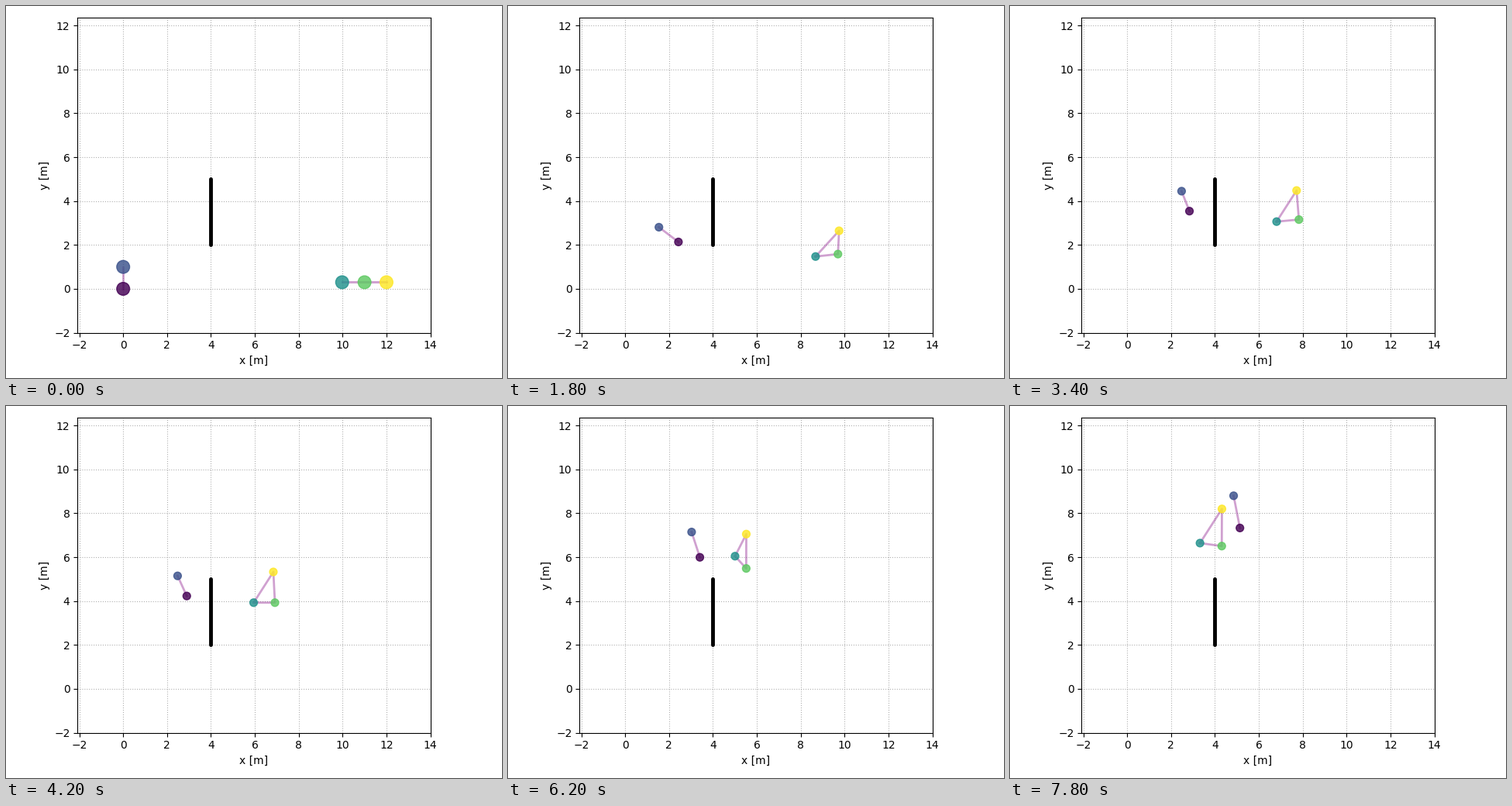
A matplotlib script for the animation above (8 s loop, 640 by 480 pixels).

```python
import numpy as np
import matplotlib.pyplot as plt
from matplotlib.animation import FuncAnimation

W, H, DPI = 640, 480, 100
FRAMES, STEP_MS = 40, 200
UNIT = 28.31                 # pixels per metre
LEFT, RIGHT, TOP, BOTTOM = 92.2, 547.55, 15.4, 421.58
ORIGIN_X, ORIGIN_Y = 151.2, 364.95


def settle(k, tau):
    """Rise from 0 towards 1."""
    return 1 - np.exp(-k / tau)


def bump(k, center, width):
    return np.exp(-((k - center) / width)**2)


def swing(k, start):
    """Accelerate to the right once past the wall."""
    return 0.01 * max(k - start, 0)**2


def wave(k, half):
    return np.sin(np.pi * k / half)


def pair_positions(k):
    """Two agents that climb along the left side of the wall."""
    lower = (2.95 * settle(k, 5.2) + swing(k, 24.2),
             0.172 * k + 0.62 * settle(k, 3) + 0.18 * bump(k, 34, 2.5))
    upper = (2.48 * min(k / 13, 1)**1.3 + swing(k, 23.6),
             1 + 0.2 * k + 0.15 * bump(k, 14, 3) - 0.18 * bump(k, 26, 4.5))
    return lower, upper


def trio_positions(k):
    """A line of three that folds into a triangle and drifts up and left."""
    push = bump(k, 33.5, 3)
    right = np.array([11 - 0.18 * k + 0.33 * wave(k, 15.3) + 0.14 * push,
                      0.3 + 0.164 * k - 0.2 * wave(k, 15.3) + 0.24 * push])
    # the left corner is squeezed inwards while passing the wall
    squeeze = bump(k, 29.5, 5.5)
    left = right + (-1.02 + 0.55 * squeeze,
                    -0.12 * wave(k, 24) + 0.5 * squeeze)
    top = right + (np.exp(-k / 8) * np.cos(np.pi * k / 20),
                   1.07 * np.tanh(k / 7) + 0.016 * k)
    return left, right, top


def positions(k):
    return np.array([*pair_positions(k), *trio_positions(k)])


fig = plt.figure(figsize=(W / DPI, H / DPI), dpi=DPI)
ax = fig.add_axes([LEFT / W, 1 - BOTTOM / H,
                   (RIGHT - LEFT) / W, (BOTTOM - TOP) / H])
ax.set_xlim((LEFT - ORIGIN_X) / UNIT, (RIGHT - ORIGIN_X) / UNIT)
ax.set_ylim((ORIGIN_Y - BOTTOM) / UNIT, (ORIGIN_Y - TOP) / UNIT)
ax.set_xticks(range(-2, 15, 2))
ax.set_yticks(range(-2, 13, 2))
ax.set_xlabel("x [m]")
ax.set_ylabel("y [m]")
ax.grid(linestyle=":")
ax.set_axisbelow(True)

ax.plot([4, 4], [2, 5], color="black", lw=3.5, solid_capstyle="round")
pair, = ax.plot([], [], color="purple", alpha=0.37, lw=2)
trio, = ax.plot([], [], color="purple", alpha=0.37, lw=2)
agents = ax.scatter(*positions(0).T, c=np.arange(5), cmap="viridis",
                    s=144, alpha=0.82, zorder=3)


def draw(k):
    pos = positions(k)
    pair.set_data(*pos[:2].T)
    trio.set_data(*pos[[2, 3, 4, 2]].T)
    agents.set_offsets(pos)
    agents.set_sizes([144 if k == 0 else 50])
    return pair, trio, agents


anim = FuncAnimation(fig, draw, frames=FRAMES, interval=STEP_MS,
                     repeat=True, repeat_delay=0)
plt.show()
```
